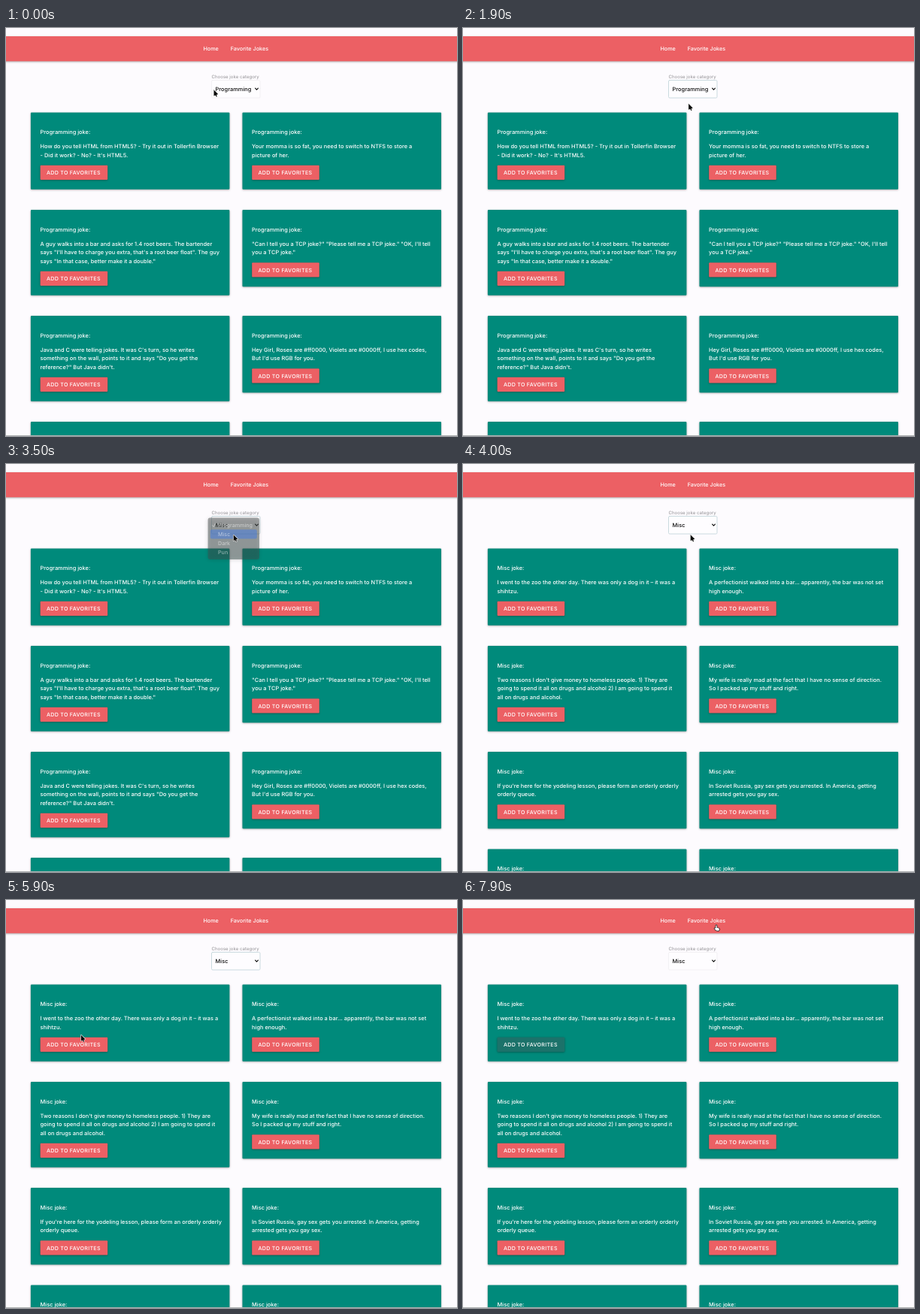
An HTML page with a canvas that plays this animation: 600x543 px, repeating every 8000 ms.

```html
<!DOCTYPE html>
<html lang="en">
<head>
<meta charset="utf-8">
<title>Jokes</title>
<style>
html, body { margin: 0; width: 100%; height: 100%; overflow: hidden; background: #fdfbfe; }
canvas { display: block; width: 600px; height: 543px; }
</style>
</head>
<body>
<canvas id="stage"></canvas>
<script>
const W = 600, H = 543, LOOP = 8000;
const PAGE = '#fdfbfe', TEAL = '#008a7b', WHITE = '#fff', INK = '#111';
const RED = [236, 96, 100], HOVER = [38, 168, 154], FOCUS = [28, 114, 106];

// Layout
const LEFT = 32.9, TOP = 112.4, COLUMN = 281.6, GAP = 27.3;
const LINE = 11.4, PAD = 12.6, BODY = 7.42, ITEM = 12.2;
const NAV = [{ label: 'Home', x: 262.4, w: 21 }, { label: 'Favorite Jokes', x: 298.7, w: 51 }];
const BUTTON = { x: PAD + 0.1, w: 89.6, h: 19.2 };
const buttonTop = lines => 47.5 + lines * LINE;

// Moments of interaction, in ms
const T = { focus: 1700, open: 2000, pick: 3450, load: 3700, barOn: 4850,
  barOff: 5550, press: 6100, blur: 6500, leave: 7120 };

// Pointer stops: time, x, y
const stops = [
  [0, 276.6, 82.6], [900, 299, 84], [T.focus, 301, 86], [1900, 300.2, 101],
  [2800, 302.8, 94.4], [4400, 302.8, 94.4], [T.barOn, 272, 27], [5200, 197, 70],
  [T.press, 86, 195.5], [7000, 86, 195.5], [7750, 337, 33.5]
];

const jokes = {
  Programming: [
    ['How do you tell HTML from HTML5? - Try it out in Tollerfin Browser',
     "- Did it work? - No? - It's HTML5."],
    ['Your momma is so fat, you need to switch to NTFS to store a',
     'picture of her.'],
    ['A guy walks into a bar and asks for 1.4 root beers. The bartender',
     'says "I\'ll have to charge you extra, that\'s a root beer float". The guy',
     'says "In that case, better make it a double."'],
    ['"Can I tell you a TCP joke?" "Please tell me a TCP joke." "OK, I\'ll tell',
     'you a TCP joke."'],
    ["Java and C were telling jokes. It was C's turn, so he writes",
     'something on the wall, points to it and says "Do you get the',
     'reference?" But Java didn\'t.'],
    ['Hey Girl, Roses are #ff0000, Violets are #0000ff, I use hex codes,',
     "But I'd use RGB for you."]
  ],
  Misc: [
    ['I went to the zoo the other day. There was only a dog in it – it was a',
     'shihtzu.'],
    ['A perfectionist walked into a bar... apparently, the bar was not set',
     'high enough.'],
    ["Two reasons I don't give money to homeless people. 1) They are",
     'going to spend it all on drugs and alcohol 2) I am going to spend it',
     'all on drugs and alcohol.'],
    ['My wife is really mad at the fact that I have no sense of direction.',
     'So I packed up my stuff and right.'],
    ["If you're here for the yodeling lesson, please form an orderly orderly",
     'orderly queue.'],
    ['In Soviet Russia, gay sex gets you arrested. In America, getting',
     'arrested gets you gay sex.']
  ]
};

const canvas = document.getElementById('stage');
const ctx = canvas.getContext('2d');
const dpr = window.devicePixelRatio || 1;
canvas.width = W * dpr;
canvas.height = H * dpr;

const rgb = c => `rgb(${c.map(Math.round).join(',')})`;
const mix = (a, b, k) => a.map((v, i) => v + (b[i] - v) * k);
const clamp = (v, lo, hi) => Math.min(hi, Math.max(lo, v));
const ramp = (t, from, len) => clamp((t - from) / len, 0, 1);
const inside = (p, x, y, w, h) => p.x >= x && p.x <= x + w && p.y >= y && p.y <= y + h;

function pointerAt(t) {
  const next = stops.findIndex(s => s[0] > t);
  const to = stops.at(next), from = next < 0 ? to : stops[next - 1];
  const u = ramp(t, from[0], to[0] - from[0] || 1);
  const [, x, y] = mix(from, to, u * u * (3 - 2 * u));
  return { x, y };
}

// Laid out at ten times the size, so that small text keeps fractional spacing
function text(str, x, y, size, color = WHITE, weight = 500, spacing = 0) {
  ctx.save();
  ctx.scale(0.1, 0.1);
  ctx.font = `${weight} ${size * 10}px Inter, Roboto, sans-serif`;
  ctx.letterSpacing = spacing * 10 + 'px';
  ctx.textRendering = 'geometricPrecision';
  ctx.fillStyle = color;
  ctx.fillText(str, x * 10, y * 10);
  ctx.restore();
}

function box(x, y, w, h, r, color) {
  ctx.beginPath();
  ctx.roundRect(x, y, w, h, r);
  ctx.fillStyle = color;
  ctx.fill();
}

function raised(x, y, w, h, r, color, blur = 2.5, alpha = 0.36) {
  ctx.save();
  ctx.shadowColor = `rgba(0,0,0,${alpha})`;
  ctx.shadowBlur = blur * dpr;
  ctx.shadowOffsetY = 0.8 * dpr;
  box(x, y, w, h, r, color);
  ctx.restore();
}

function stroke(points, width, color) {
  ctx.beginPath();
  points.forEach(([x, y]) => ctx.lineTo(x, y));
  ctx.lineWidth = width;
  ctx.strokeStyle = color;
  ctx.lineCap = ctx.lineJoin = 'round';
  ctx.stroke();
}

function card(x, y, title, lines, color) {
  const h = 79.5 + lines.length * LINE, by = y + buttonTop(lines.length);
  raised(x, y, 264.5, h, 1, TEAL);
  text(title, x + PAD, y + 28.8, BODY);
  lines.forEach((line, i) => text(line, x + PAD, y + 47.7 + i * LINE, BODY));
  raised(x + BUTTON.x, by, BUTTON.w, BUTTON.h, 1, color);
  text('ADD TO FAVORITES', x + 21, by + 12.3, 7.15, WHITE, 500, 0.26);
  return h;
}

function cards(t, name) {
  const hot = mix(mix(RED, HOVER, ramp(t, T.press - 150, 200)), FOCUS, ramp(t, T.leave, 200));
  for (let i = 0, y = TOP; y < H; i += 2) {
    const heights = [0, 1].map(j => card(LEFT + j * COLUMN, y, name + ' joke:',
      jokes[name][i + j] || [], rgb(i + j ? RED : hot)));
    y += Math.max(...heights) + GAP;
  }
}

function header() {
  raised(-5, 10.9, W + 10, 33.3, 0, rgb(RED));
  NAV.forEach(n => text(n.label, n.x, 30.1, 7.25));
}

function select(t) {
  const focused = t >= T.focus && t < T.blur;
  text('Choose joke category', 273.5, 67.3, 6.1, '#949296', 400);
  box(273.5, 69.5, 64.5, 23.5, 1.5, '#fefdff');
  ctx.lineWidth = focused ? 0.9 : 0.6;
  ctx.strokeStyle = focused ? '#c5d6dc' : '#ebe9ed';
  ctx.stroke();
  text(t < T.pick ? 'Programming' : 'Misc', 278.6, 83.9, BODY, INK);
  stroke([[331.6, 80.2], [333.5, 82.2], [335.4, 80.2]], 1.2, INK);
}

function menu(t, p) {
  if (t < T.open || t >= T.pick + 100) return;
  const row = clamp(Math.floor((p.y - 75) / ITEM), 0, 3);
  const tint = ctx.createLinearGradient(0, 72, 0, 127);
  tint.addColorStop(0, '#4c5050');
  tint.addColorStop(1, '#3a524f');
  ctx.save();
  ctx.globalAlpha = 1 - ramp(t, T.pick, 100);
  raised(268.6, 71.6, 68.4, 55.4, 3.2, tint, 5, 0.3);
  box(271.8, 75 + row * ITEM, 62, ITEM, 2, '#3f7be6');
  ['Programming', 'Misc', 'Dark', 'Pun'].forEach((s, i) =>
    text(s, 282, 83.8 + i * ITEM, 7.15));
  stroke([[274.5, 81.6], [276, 83.6], [278.8, 78.8]], 0.9, WHITE);
  ctx.restore();
}

function statusBar(t) {
  ctx.save();
  ctx.globalAlpha = ramp(t, T.barOn, 100) * (1 - ramp(t, T.barOff, 150));
  box(0, 534.5, 49, 8.5, [0, 2, 0, 0], '#2e3234');
  text('localhost:5173', 1.2, 542, 6.4, '#e2e4e5', 400);
  ctx.restore();
}

function arrow() {
  const head = [[0, 0], [0, 7.6], [5.4, 5.4], [0, 0]], tail = [[2, 5], [3.5, 8.3]];
  for (const [grow, color] of [[1.3, WHITE], [0.2, '#0a0a0a']]) {
    stroke(head, grow, color);
    ctx.fillStyle = color;
    ctx.fill();
    stroke(tail, grow + 1.1, color);
  }
}

function hand() {
  for (const [grow, color] of [[1.4, '#1c1c1c'], [0, WHITE]]) {
    stroke([[0, 0.6], [0, 5]], 1.3 + grow, color);
    stroke([[-2, 4.4], [0, 6.4]], 1.1 + grow, color);
    stroke([[0.6, 5.2], [2.2, 5.6]], 3.6 + grow, color);
  }
}

function pointer(p) {
  const overLink = NAV.some(n => inside(p, n.x, 20, n.w, 17));
  const overButton = inside(p, LEFT + BUTTON.x, TOP + buttonTop(2), BUTTON.w, BUTTON.h);
  ctx.save();
  ctx.translate(p.x, p.y);
  if (overLink || overButton) hand(); else arrow();
  ctx.restore();
}

function draw(t) {
  const p = pointerAt(t);
  ctx.setTransform(dpr, 0, 0, dpr, 0, 0);
  ctx.fillStyle = PAGE;
  ctx.fillRect(0, 0, W, H);
  header();
  select(t);
  cards(t, t < T.load ? 'Programming' : 'Misc');
  ctx.fillStyle = '#aeb0b1';
  ctx.fillRect(0, 542, W, 1);
  statusBar(t);
  menu(t, p);
  pointer(p);
}

function tick() {
  draw(performance.now() % LOOP);
  requestAnimationFrame(tick);
}
tick();
</script>
</body>
</html>
```
